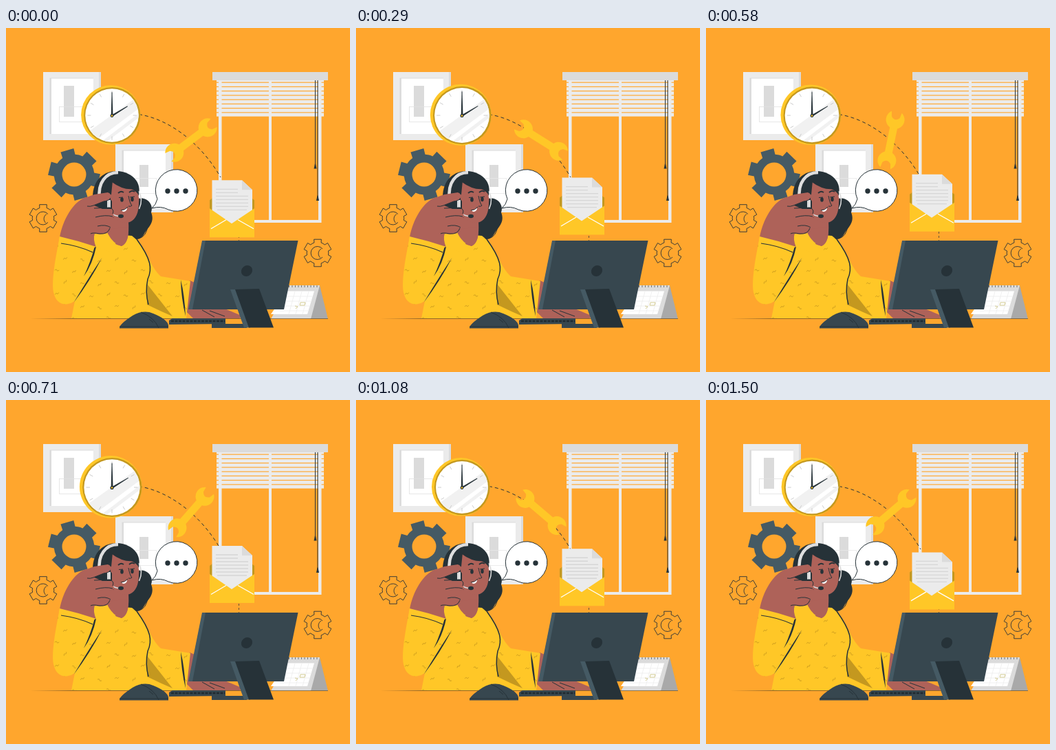
An HTML page for the animation above (1.54 s loop, 500 by 500 pixels).

```html
<!DOCTYPE html>
<html lang="en">
<head>
<meta charset="utf-8">
<title>Support desk</title>
<style>
html, body { margin: 0; width: 100%; height: 100%; overflow: hidden; background: #ffa62d; }
svg { display: block; width: 100vw; height: 100vh; }
.line { fill: none; stroke: #263238; stroke-linejoin: round; }
.ink { fill: #263238; }
.slate { fill: #37474f; }
.steel { fill: #455a64; }
.sun { fill: #ffc727; }
.gold { fill: #c4981f; }
.skin { fill: #ae6259; }
.pale { fill: #ebebeb; }
.grey { fill: #dbdbdb; }
.white { fill: #fff; }
</style>
</head>
<body>
<svg viewBox="0 0 500 500">
  <defs>
    <clipPath id="face"><circle cx="154" cy="127" r="38"/></clipPath>
    <clipPath id="shirt"><use href="#body"/></clipPath>
    <g id="picture">
      <path class="pale" d="M0 0H81V99H0Z"/>
      <path class="grey" d="M81 0H84V99H81Z"/>
      <path class="grey" d="M9.500 8.500H73V90H9.500Z"/>
      <path class="white" d="M12 9.500H73V90H12Z"/>
    </g>
  </defs>
  <rect width="500" height="500" fill="#ffa62d"/>

  <!-- window -->
  <path class="pale" d="M309 76h4.500v203h68.500v-203h4v203h68v-203h4.500v207h-149.500z"/>
  <g id="blinds" class="pale"></g>
  <path class="grey" d="M300 64H468V76H300Z"/>
  <path class="line" d="M449.500 76V201M453 76V247"/>
  <path class="ink" d="M449 197h1l1.500 7.500h-4zM452.500 243.500h1l1.500 7.500h-4z"/>

  <!-- pictures -->
  <use href="#picture" x="54" y="64"/>
  <rect class="grey" x="84" y="84" width="15" height="45"/>
  <rect x="77.500" y="114.500" width="34" height="22" fill="none" stroke="#e2e2e2" stroke-width=".8"/>
  <use href="#picture" x="159" y="169"/>
  <rect class="grey" x="194" y="199" width="13" height="32"/>
  <rect x="184.500" y="218.500" width="34" height="22" fill="none" stroke="#e8e8e8" stroke-width=".8"/>

  <path class="line" stroke-dasharray="5 4" d="M193 125.500C240 133 285 170 312 217"/>
  <path class="line" stroke-width=".7" stroke-dasharray="3 3" d="M338.500 296V310"/>

  <!-- clock -->
  <g id="clock">
    <circle class="sun" cx="152.300" cy="126.300" r="42.300"/>
    <circle class="gold" cx="154.300" cy="127" r="40.300"/>
    <circle class="white" cx="154" cy="127" r="38"/>
    <g clip-path="url(#face)" fill="#f1f1f1">
      <path d="M121 150L184 105L194 116L132 162Z"/>
      <path d="M137 166L195 122V128L142 168Z"/>
    </g>
    <g id="ticks" stroke="#c9c9c9" stroke-width=".9"></g>
    <path class="ink" d="M152.700 128L153.600 94H154.500L155.500 128Z"/>
    <path class="ink" d="M153.400 126.600L176 113.600L176.400 114.400L154.600 128.600Z"/>
    <circle class="ink" cx="154" cy="127.500" r="2.400"/>
    <circle class="sun" cx="154" cy="127.500" r="1.200"/>
  </g>

  <!-- gears -->
  <path id="gear" class="steel" fill-rule="evenodd"/>
  <g class="line" stroke-width=".9">
    <path id="gearL"/>
    <path d="M61 270.500A9.500 9.500 0 1 0 61 282.500M59 270.500A8 8 0 0 0 58 283.500"/>
    <path id="gearR"/>
    <path d="M460 321A9.500 9.500 0 1 0 460 333M458 321A8 8 0 0 0 457 334"/>
  </g>

  <g id="wrench" class="sun">
    <path d="M-21 -5.500H21V5.500H-21Z"/>
    <path id="jaw" d="M41.500 -7.500A13.500 13.500 0 1 0 41.500 7.500L34 6Q27 0 34 -6Z"/>
    <use href="#jaw" transform="rotate(180)"/>
  </g>

  <!-- envelope -->
  <g id="mail">
    <path class="gold" d="M296 264V250L300 247H357L361 250V264Z"/>
    <path class="pale" d="M299.500 221H343L358 235V266L328 287L299.500 267Z"/>
    <path class="grey" d="M343 221V235H358Z"/>
    <path d="M305 234H337M305 239H337M305 244H352M305 249H352M305 254H352M305 259H352M307 264H350" stroke="#d6d6d6" stroke-width="1.300"/>
    <path class="sun" d="M296 262L328 284L361 262V304H296Z"/>
    <path d="M298 291.500L320 278.500M360 291.500L337 278.500" fill="none" stroke="#fff" stroke-width="1.300"/>
  </g>

  <!-- calendar -->
  <path fill="#a9a9a9" d="M456 374L468 423H440Z"/>
  <path class="grey" d="M412 374H456L443 423H385Z"/>
  <path class="white" d="M408 382.500H448L438 416H385Z"/>
  <path d="M403 390H445M401 397H443M400 404H441M398 411H439M420 383L411 416M430 383L421 416M440 383L431 416" fill="none" stroke="#ececec" stroke-width=".8"/>
  <path d="M428 399H435L434 403H427ZM420 404L424 405L421 408" fill="none" stroke="#c9bf7a" stroke-width=".8"/>
  <path d="M411 375.500H456" fill="none" stroke="#777" stroke-width="3" stroke-dasharray="1 3.500"/>

  <path d="M35 422.500L95 422H468V422.800H95Z" fill="#6d5328"/>

  <!-- woman -->
  <path class="ink" d="M184 252C200 240 216 254 211 268C217 283 206 290 201 299C194 313 176 308 166 293Z"/>
  <path class="line" d="M210 270Q214 282 206 288Q204 303 193 306"/>
  <path class="ink" d="M126 246C126 219 144 207 163 208C184 210 197 224 193 243L160 278L137 270Z"/>
  <path class="skin" d="M267 367L277 371L273 408H318L342 418L340 422H272L262 412Z"/>
  <path class="line" d="M285 410L303 420M296 411L318 419"/>
  <path id="body" class="sun" d="M78 303C72 335 66 365 69 384Q73 402 88 401.500Q94 401 100 397L95 422H262L268 368L225 361C208 346 205 318 183 302L150 299L131 318Z"/>
  <g id="marks" clip-path="url(#shirt)" fill="none" stroke="#c99a1e" stroke-width=".8"></g>
  <path class="gold" d="M205 372L242 419L226 412L205 402Z"/>
  <path class="skin" d="M142 272L178 281Q180 312 168 317Q153 314 140 298Z"/>
  <path class="skin" d="M154 224Q170 236 186 234Q195 240 193 254C193 268 189 278 180 282Q168 286 156 275L148 256Z"/>
  <path d="M192.500 237Q200 249 193.500 263" fill="none" stroke="#dedede" stroke-width="1.600"/>
  <path class="ink" d="M151 218Q169 211 184 220Q193 227 193 242Q185 233 174 232Q162 229 155 222L153 242L144 246Z"/>
  <path class="line" stroke-width="1.800" d="M163 240Q167 236 171 239M179 239Q183 235 187 238"/>
  <ellipse class="ink" cx="168.500" cy="249.500" rx="2.300" ry="3.300"/>
  <ellipse class="ink" cx="183.500" cy="249" rx="2.200" ry="3.300"/>
  <path class="line" d="M164 246.500L170 246M180 246L187 245M178 244Q180 255 183 258Q181 260 178 259"/>
  <path class="white" d="M168 265Q172 265 176 261Q176 267 170 267Z"/>
  <path class="line" d="M167 265Q173 265 177 260"/>
  <path d="M136 248C133 225 145 210 163 210" fill="none" stroke="#dedede" stroke-width="4.500"/>
  <path d="M151 262Q152 273 165 273.500" fill="none" stroke="#d7d7d7" stroke-width="1.800"/>
  <ellipse class="ink" cx="167" cy="273.500" rx="4" ry="2.800"/>
  <path class="skin" d="M78 305C82 279 98 252 116 246L140 243L151 261Q158 264 156 270Q158 275 152 279Q154 285 152 290Q151 299 139 299L150 299L131 318L130 320L78 313Z"/>
  <path class="sun" d="M131 319Q126 306 129 299Q141 301 151 297L160 312L150 325Z"/>
  <path class="skin" d="M148 293L178 289Q179 312 168 317Q156 314 148 299Z"/>
  <path class="ink" d="M126 257L148 243L154 252V263H140Z"/>
  <path class="grey" d="M147 250H152V261H147Z"/>
  <path class="skin" d="M108 252Q122 242 135 241L148 239Q154 241 152 247Q150 251 142 252L127 258L118 264Z"/>
  <path class="line" d="M152 247Q150 251 142 252L127 258Q122 260 118 259M128 262L151 261Q158 264 155 270M130 275Q145 271 155 274M133 288Q145 285 152 290M151 291Q148 300 136 299Q126 297 123 299"/>
  <path class="sun" d="M78 303Q104 309 131 318L125 333L76 318Z"/>
  <path class="line" stroke-width="1.200" d="M80 313Q104 316 126 326"/>
  <path class="ink" d="M131 318Q126 343 113 361Q123 340 128.500 319ZM139.500 334Q122 368 98.500 399Q122 360 139.500 334ZM254 366Q259.500 388 261 419Q254.500 392 254 366Z"/>
  <path class="line" stroke-width="1.500" d="M190 307C211 336 213 350 206 365Q202 384 207 402"/>

  <!-- speech bubble -->
  <path d="M220 248.500A30.300 30.300 0 1 1 236 264Q225 258 212 262Q218 257 220 248.500Z" fill="#fff" stroke="#263238"/>
  <g class="ink"><circle cx="235" cy="237" r="3.700"/><circle cx="248" cy="237" r="3.700"/><circle cx="261" cy="237" r="3.700"/></g>

  <!-- desk -->
  <path class="steel" d="M285 309H292L273 409H265Z"/>
  <path class="slate" d="M290 309H424.500L404 409H271Z"/>
  <ellipse class="ink" cx="350" cy="353" rx="8.500" ry="7.500" transform="rotate(-40 350 353)"/>
  <path class="slate" d="M299 430H350V436H299Z"/>
  <path class="steel" d="M326 380H335L355 435.500H346Z"/>
  <path class="ink" d="M333 380L368 379L389 435.500H353Z"/>
  <path class="slate" d="M237 425L242 422H319V430L237 431Z"/>
  <path d="M240 426H318" fill="none" stroke="#1f2a30" stroke-width="2.500" stroke-dasharray="4 1.500"/>
  <path class="slate" d="M165 436.500Q164 431 184 418Q200 409 214 415Q234 423 236 432V436.500Z"/>
  <path class="line" d="M196 413Q215 420 222 436M208 423L214 428M165 434H236"/>
</svg>
<script>
const LOOP = 1540, FRAMES = 37;
const el = id => document.getElementById(id);
const point = (x, y, r, deg) => {
  const a = deg * Math.PI / 180;
  return (x + r * Math.cos(a)).toFixed(2) + " " + (y + r * Math.sin(a)).toFixed(2);
};

// Six broad teeth round a circular body.
function gear(x, y, outer, start) {
  const inner = outer * .77;
  let d = "";
  for (let k = 0; k < 6; k++) {
    const a = start + k * 60;
    d += (k ? "L" : "M") + point(x, y, inner, a - 19) +
      "L" + point(x, y, outer, a - 15) +
      "L" + point(x, y, outer, a + 15) +
      "L" + point(x, y, inner, a + 19) +
      `A${inner} ${inner} 0 0 1 ` + point(x, y, inner, a + 41);
  }
  return d + "Z";
}

el("gear").setAttribute("d", gear(99, 213, 38, -106) +
  "M81.500 213a17.500 17.500 0 1 0 35 0a17.500 17.500 0 1 0 -35 0Z");
el("gearL").setAttribute("d", gear(54, 276.500, 20.500, -90));
el("gearR").setAttribute("d", gear(453, 327, 20.500, -90));

let slats = `<rect x="306" y="76" width="156" height="2.500"/>`, ticks = "", marks = "";
for (let k = 0; k < 8; k++)
  slats += `<rect x="306" y="${79.700 + k * 6.250}" width="156" height="5.100"/>`;
for (let k = 0; k < 12; k++)
  ticks += `<path d="M${point(154, 127, 30, k * 30)}L${point(154, 127, 35, k * 30)}"/>`;
for (let row = 0; row < 7; row++)
  for (let col = 0; col < 8; col++) {
    const x = 74 + col * 25 + row % 2 * 12, y = 318 + row * 17 + col * 7 % 5;
    const turn = (col * 53 + row * 31) % 90 - 45;
    marks += `<path transform="translate(${x} ${y}) rotate(${turn})" d="M-3 1Q-1 -2 0 0T3 -1"/>`;
  }
el("blinds").innerHTML = slats;
el("ticks").innerHTML = ticks;
el("marks").innerHTML = marks;

const startOf = i => Math.round(i * 25 / 6) * 10;
function stepAt(t) {
  let i = Math.floor(t * .024);
  if (startOf(i + 1) <= t) i++;
  if (startOf(i) > t) i--;
  return Math.min(i, FRAMES - 1);
}

function beat(i, peak) {
  let d = Math.abs(i - peak);
  d = Math.min(d, FRAMES - d);
  return d < 7 ? Math.cos(d / 14 * Math.PI) ** 2 : 0;
}

function draw(now) {
  const i = stepAt(now % LOOP);
  const size = 1 + .07 * (beat(i, 4.500) + beat(i, 17.500));
  const lift = 4.700 * (1 + Math.cos((i - 17.300) / FRAMES * 2 * Math.PI));
  el("wrench").setAttribute("transform", `translate(269 163) rotate(${-37 + i * 9.900})`);
  el("clock").setAttribute("transform", `translate(154 127) scale(${size}) translate(-154 -127)`);
  el("mail").setAttribute("transform", `translate(0 ${.4 - lift})`);
}

const begin = performance.now();
function tick() {
  draw(performance.now() - begin);
  requestAnimationFrame(tick);
}
draw(0);
requestAnimationFrame(tick);
</script>
</body>
</html>
```
